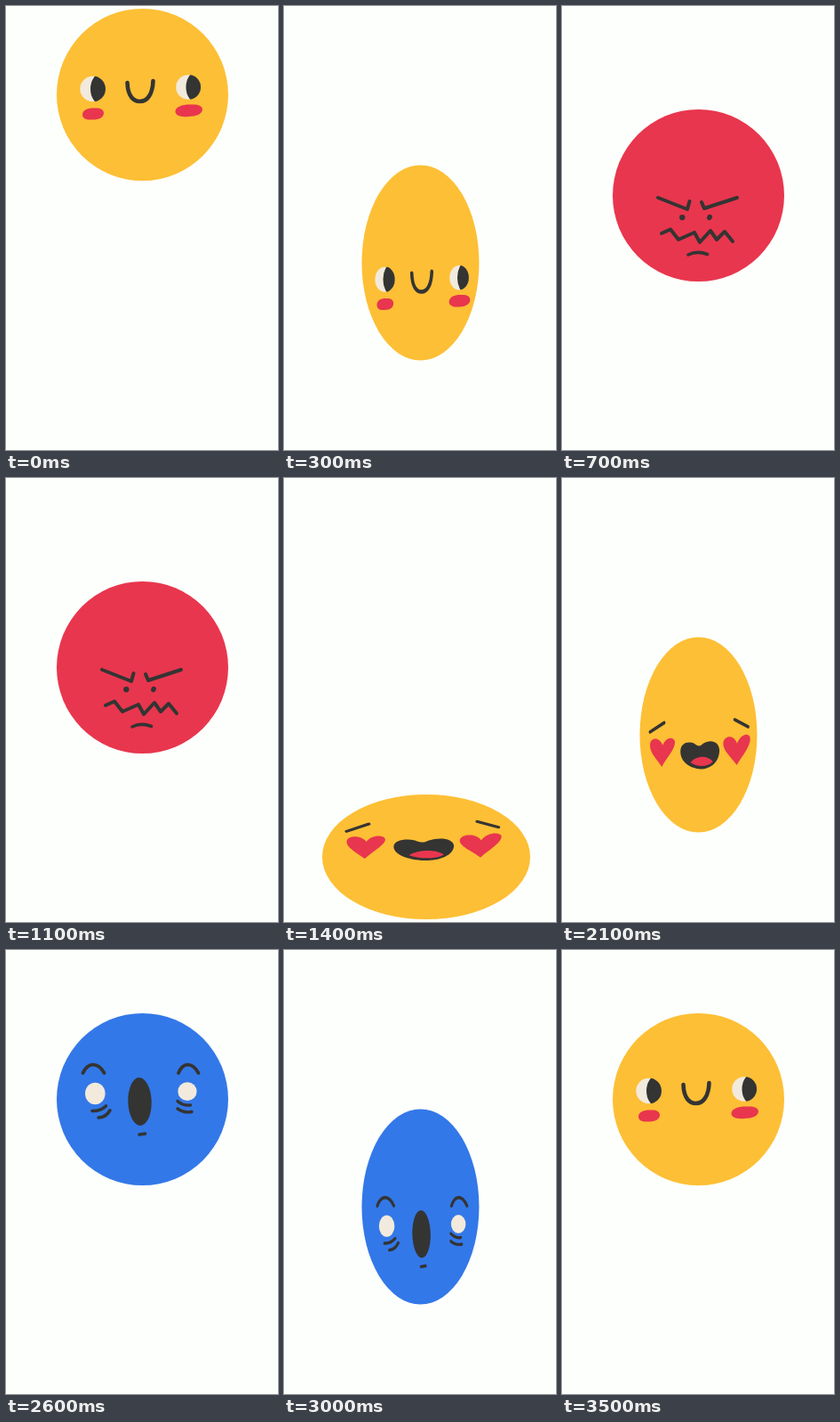
These frames come from a looping animation (306x498 px, 3.6 s). An HTML page with a canvas:

```html
<!DOCTYPE html>
<html lang="en">
<head>
<meta charset="utf-8">
<title>Bouncing moods</title>
<style>
html, body { margin: 0; width: 100%; height: 100%; overflow: hidden; background: #fdfffc; }
canvas { display: block; width: 306px; height: 498px; }
</style>
</head>
<body>
<canvas id="stage"></canvas>
<script>
const W = 306, H = 498, STEP = 100, BOUNCE = 9, LOOP = 36;
const YELLOW = '#fdbf35', RED = '#e8364e', BLUE = '#3378e8';
const DARK = '#343433', CREAM = '#f2eadc', PAPER = '#fdfffc';

const canvas = document.getElementById('stage');
const ratio = window.devicePixelRatio || 1;
canvas.width = W * ratio;
canvas.height = H * ratio;
const ctx = canvas.getContext('2d');

function blob(x, y, rx, ry, color, turn = 0) {
  ctx.fillStyle = color;
  ctx.beginPath();
  ctx.ellipse(x, y, rx, ry, turn, 0, Math.PI * 2);
  ctx.fill();
}

function shape(d, color) {
  ctx.fillStyle = color;
  ctx.fill(new Path2D(d));
}

function line(d, width) {
  ctx.lineWidth = width;
  ctx.stroke(new Path2D(d));
}

function eye(x, y, r) {
  blob(x, y, r, r, CREAM);
  ctx.save();
  ctx.beginPath();
  ctx.arc(x, y, r + 0.3, 0, Math.PI * 2);
  ctx.clip();
  blob(x + 9, y, 11.5, 17, DARK);
  ctx.restore();
}

function smile() {
  eye(97.5, 158, 14.2);
  eye(205, 156, 13.8);
  line('M136.5 151C137 167 144 172 150.5 172C159 172 165 164 165.5 149', 4.6);
  shape('M86 187C86 182 91 179.5 99 179.5C106 179 110 181 110 185C110 190 105 192.5 97 192.5C90 193 86 191 86 187Z', RED);
  shape('M190.5 183C191 178 198 175.5 207 175.5C216 175 221 177 221 181C221 186 214 189 205 189C196 190 190 187 190.5 183Z', RED);
}

function angry() {
  ctx.translate(0, -69);
  line('M108 215L141 228L143.5 219', 4);
  line('M157 220L160 227L197 215', 4);
  blob(135.3, 237.2, 3.2, 3.1, DARK);
  blob(166, 237, 2.8, 3.3, DARK, 0.4);
  line('M112 255L122 250.5L131 262L149 254L155 265L167 252L174 262L183 253L192 264', 4);
  line('M142 279Q152 274 163.5 278.5', 3.6);
}

function love() {
  line('M79 136L99.5 125.5', 3.8);
  line('M201.5 122L221 130', 3.8);
  shape('M96 175.5C88 166 78 159 79 150C80 142 92 141 97.5 151C101 142 113 140 115 147C116 155 103 165 96 175.5Z', RED);
  shape('M204.5 173.5C195 163 184 157 185 148C187 139 201 139 205 149C210 138 222 136 224 142.5C225 152 212 163 204.5 173.5Z', RED);
  shape('M123 158C123 148 135 146 143 149C149 153 152 152 156 149C166 144 179 146 179.5 157C179 170 167 178 152 178C137 177 123 170 123 158Z', DARK);
  shape('M137.5 170.5C146 162 163 162 170 169.5C163 176 147 176 137.5 170.5Z', RED);
}

function shock() {
  blob(100.3, 161, 11.3, 12.2, CREAM);
  blob(204, 158.7, 10.6, 10.4, CREAM);
  line('M86.5 138C92 126 103 125 110.5 138', 3.8);
  line('M194 138C199 126 209 125 216.5 138', 3.8);
  blob(150.5, 170, 13.2, 27, DARK, -0.03);
  line('M150 207L156.5 206', 3.6);
  line('M97 180.5Q106 181 112.5 175', 3.6);
  line('M104 188Q112 188 117 180', 3.6);
  line('M193 169.5Q199 175 207.5 174', 3.4);
  line('M193 178Q200 183 209 181.5', 3.4);
}

const moods = [
  { color: YELLOW, face: smile },
  { color: RED, face: angry },
  { color: YELLOW, face: love },
  { color: BLUE, face: shock }
];

// body: centre and radii; face: centre and scale, from the top of a bounce to its squash
const poses = [
  { body: [153.5, 99.5, 96.5, 96.5], face: [151, 95, 1, 1] },
  { body: [153.5, 167.5, 96.5, 96.5], face: [151, 160, 1, 1] },
  { body: [153.5, 212.5, 96.5, 96.5], face: [151, 229, 1, 1] },
  { body: [153.5, 288, 66, 109.5], face: [155, 308.7, 0.777, 0.99] },
  { body: [160, 425, 117, 70], face: [157, 415, 1.2, 0.78] }
];

function draw(tick) {
  const phase = tick % BOUNCE;
  const { body, face } = poses[Math.min(phase, BOUNCE - phase)];
  const mood = moods[Math.floor((tick + 4) / BOUNCE) % moods.length];
  const [x, y, sx, sy] = face;

  ctx.setTransform(ratio, 0, 0, ratio, 0, 0);
  ctx.fillStyle = PAPER;
  ctx.fillRect(0, 0, W, H);
  blob(...body, mood.color);

  ctx.translate(x, y);
  ctx.scale(sx, sy);
  ctx.translate(-151, -160);
  ctx.strokeStyle = DARK;
  ctx.lineCap = ctx.lineJoin = 'round';
  mood.face();
}

const start = performance.now();
function loop() {
  draw(Math.floor((performance.now() - start) / STEP) % LOOP);
  requestAnimationFrame(loop);
}
loop();
</script>
</body>
</html>
```
